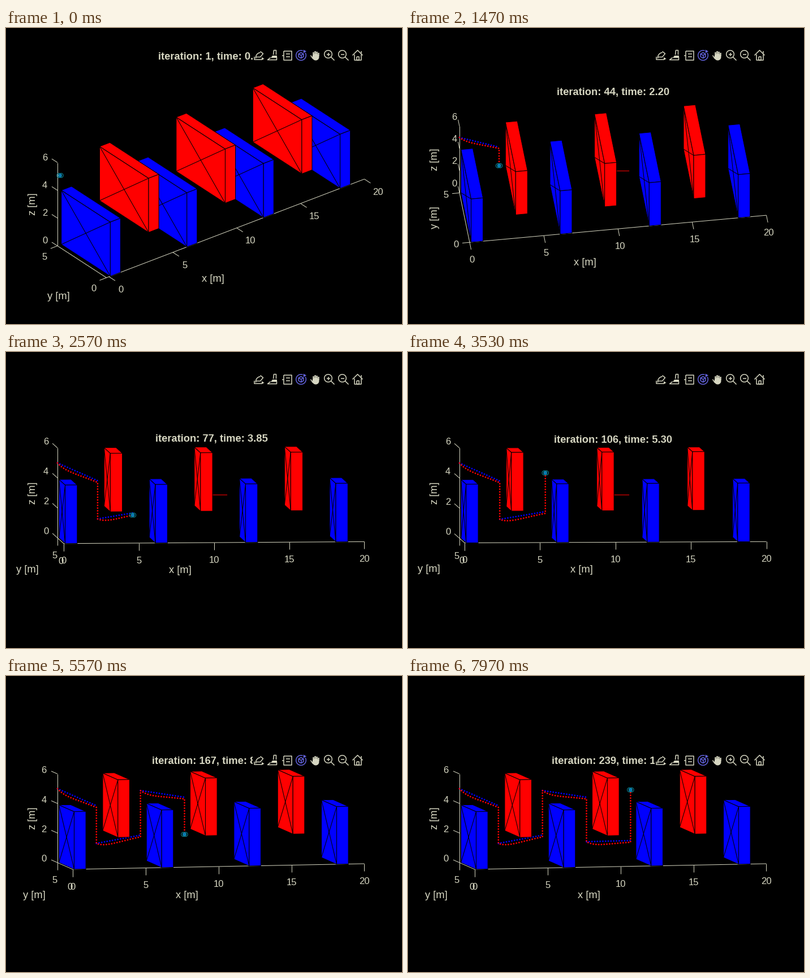
These frames come from a looping animation (700x525 px, 8 s). A matplotlib script:

```python
import numpy as np
import matplotlib.pyplot as plt
from matplotlib.animation import FuncAnimation
from matplotlib.collections import LineCollection, PolyCollection
from matplotlib.patches import Circle, Rectangle
from matplotlib.transforms import Affine2D

W, H, DPI, FRAMES, STEP_MS = 700, 525, 100, 320, 25
PX = 72 / DPI                      # points per pixel
TEXT, PURPLE = "#d7d7c2", "#6464e0"
TICK_PX, LABEL_PX = 16.67, 18.33
TOOLBAR_MOVE = 138

plt.rcParams["font.family"] = "Liberation Sans"
fig = plt.figure(figsize=(W / DPI, H / DPI), dpi=DPI, facecolor="black")
ax = fig.add_axes([0, 0, 1, 1])
ax.set(xlim=(0, W), ylim=(H, 0))
ax.axis("off")

# mouse drags: first and last iteration, turn in azimuth and elevation
DRAGS = [(26, 44, 29.7, 12), (50, 61, -1.8, -32.8), (61, 82, 5.7, -5.7), (112, 124, -7.9, 1.8)]

# flight in legs: forward for a fixed time, then straight up or down
STARTS = np.array([0, 60, 111, 176, 240])
HEIGHTS = np.array([5, 1.25, 4.77, 1.25, 4.77])    # at the start of each leg
CORNERS = np.array([3.8, 1.75, 4.26, 1.27])        # at the end of its forward part
FORWARD = 22


def ease(t, start, end):
    u = np.clip((t - start) / (end - start), 0, 1)
    return u * u * (3 - 2 * u)


def flight(t):
    """Planned x and z, flown z, and whether the plan is moving forward."""
    i = np.clip(np.searchsorted(STARTS, t, side="right") - 1, 0, len(CORNERS) - 1)
    turn = STARTS[i] + FORWARD
    u = np.clip((t - STARTS[i]) / FORWARD, 0, 1)
    v = np.clip((t - turn) / (STARTS[i + 1] - turn), 0, 1)
    rise = v + 0.06 * np.sin(np.pi * v)
    x0, x1 = (np.maximum(0, 3.02 * k - 0.35) for k in (i, i + 1))
    x = x0 + (x1 - x0) * u
    z = HEIGHTS[i] + (CORNERS[i] - HEIGHTS[i]) * u + (HEIGHTS[i + 1] - CORNERS[i]) * rise
    lag = (0.05 * u + 1.8 * u * np.exp(-3.3 * u)) * (1 - v)
    return x, z, z - lag, v == 0


class Camera:
    """Orthographic view fitted to the width of the plot area."""

    def __init__(self, t, xmin):
        az = -37.5 + sum(d * ease(t, a, b) for a, b, d, _ in DRAGS)
        self.az = -az
        self.el = 30 + sum(d * ease(t, a, b) for a, b, _, d in DRAGS)
        a, e = np.radians([self.az, self.el])
        ca, sa, ce, se = np.cos(a), np.sin(a), np.cos(e), np.sin(e)
        span = 20 - xmin
        s = 542.5 / (span * ca + 5 * sa)
        self.ex = s * np.array([ca, -sa * se])
        self.ey = s * np.array([-sa, -ca * se])
        self.ez = s * np.array([0, -ce])
        height = s * (span * sa * se + 5 * ca * se + 6 * ce)
        self.top = 253.3 - height / 2
        self.origin = np.array([91 + 5 * sa * s, 253.3 + height / 2]) - xmin * self.ex

    def __call__(self, x, y, z):
        x, y, z = (np.asarray(v, float)[..., None] for v in (x, y, z))
        return self.origin + x * self.ex + y * self.ey + z * self.ez


def unit(v):
    return v / np.hypot(*v)


def text(s, size, **kw):
    return ax.text(0, 0, s, size=size * PX, color=TEXT, ha="center", va="baseline",
                   rotation_mode="anchor", zorder=4, **kw)


def put_tick(label, p):
    label.set_position((p[0], p[1] + 0.345 * TICK_PX))


def put_label(label, p, upright=False):
    label.set_rotation(90 if upright else 0)
    label.set_position((p[0] + 5, p[1]) if upright else (p[0], p[1] + 5))


# plot artists
x_ticks = {v: text(str(v), TICK_PX) for v in range(0, 21, 5)}
y_ticks = {v: text(str(v), TICK_PX) for v in (0, 5)}
z_ticks = {v: text(str(v), TICK_PX) for v in range(0, 7, 2)}
x_label, y_label, z_label = (text(f"{c} [m]", LABEL_PX) for c in "xyz")
title = text("", LABEL_PX, weight="bold")

frame_lines = LineCollection([], colors=TEXT, linewidths=PX, zorder=1)
ax.add_collection(frame_lines)


def dotted(color, z):
    return ax.plot([], [], color=color, lw=2.9 * PX, ls=(0, (0.01, 1.65)),
                   dash_capstyle="round", zorder=z)[0]


blue_path, red_path = dotted("blue", 1.5), dotted("red", 1.6)
pivot, = ax.plot([362, 389.5], [253, 253], color="#e00000", lw=1.2 * PX, zorder=1.7)

# far blocks first; every second one is red and raised
BLOCKS = [(0.1 + 3 * i, 2.1 * (i % 2), ("blue", "red")[i % 2]) for i in range(6, -1, -1)]
block_art = PolyCollection([], edgecolors="black", linewidths=PX, zorder=2,
                           facecolors=[c for _, _, c in BLOCKS for _ in range(5)])
ax.add_collection(block_art)

rotors = [Circle((0, 0), 3.8, fill=False, ec="#0b8090", lw=1.1 * PX, zorder=3) for _ in range(2)]
body = Circle((0, 0), 3.2, fc="#0a78b4", ec="#0b8090", lw=0.8 * PX, zorder=3.1)
for part in (*rotors, body):
    ax.add_patch(part)


# toolbar icons, each drawn around its own centre
def arc(r, start=0, end=360, n=40, x=0, y=0):
    a = np.radians(np.linspace(start, end, n))
    return np.c_[x + r * np.cos(a), y + r * np.sin(a)]


def box(x, y, w, h):
    return [(x, y), (x + w, y), (x + w, y + h), (x, y + h), (x, y)]


def export_icon():
    return ([[(-8, 2), (-8, 7), (5, 7)], arc(9, 170, 265, x=4, y=4),
             [(-5, 3), (3, 3), (8, -3), (3, -7)]], [arc(3, 0, 360, 4, x=7, y=6)])


def brush_icon():
    return [[(1, -1), (2, -9), (6, -9), (6, -1)], [(-4, 4), (-9, 8), (7, 8), (7, 3)]], \
           [[(-1, 0), (7, 0), (7, 4), (-4, 4)]]


def tip_icon():
    return [box(-6, -8, 14, 16), [(-9, 0), (-6, 0)]] + [[(-2, y), (5, y)] for y in (-3, 2)], []


def rotate_icon():
    cube = arc(5, -90, 270, 7)
    return ([arc(8.8, -30, 290), cube] + [[(0, 0), cube[k]] for k in (1, 3, 5)],
            [arc(3.5, 0, 360, 4, x=6, y=-7)])


def hand_icon():
    fingers = [[(x, y), (x, 1)] for x, y in zip((-3, 0, 3, 6), (-6, -8, -7, -5))]
    wide = [[(x + d, y) for x, y in f] for f in fingers for d in (-0.4, 0.4)]
    return wide + [[(-8, 0), (-4, 6)]], [arc(6, x=1, y=3)]


def zoom_icon(plus):
    cross = [[(-5, -2), (1, -2)]] + [[(-2, -5), (-2, 1)]] * plus
    return [arc(6.8, x=-2, y=-2), [(3, 3), (9, 9)]] + cross, []


def home_icon():
    return [[(-9, 0), (0, -9), (9, 0)], [(-6, -2), (-6, 8), (6, 8), (6, -2)],
            box(-2, 2, 4, 6), [(6, -4), (6, -8)]], []


shift = Affine2D()
tool_tr = shift + ax.transData


def build_toolbar():
    ax.add_patch(Rectangle((435.5, -13), 198, 26, fc="black", transform=tool_tr, zorder=6))
    icons = [export_icon(), brush_icon(), tip_icon(), rotate_icon(), hand_icon(),
             zoom_icon(True), zoom_icon(False), home_icon()]
    for k, (lines, fills) in enumerate(icons):
        offset = (446.5 + 25 * k, 0)
        color = PURPLE if k == 3 else TEXT
        lines, fills = ([np.array(p, float) + offset for p in part] for part in (lines, fills))
        ax.add_collection(LineCollection(lines, colors=color, linewidths=1.5 * PX,
                                         transform=tool_tr, zorder=7))
        ax.add_collection(PolyCollection(fills, facecolors=color, edgecolors="none",
                                         transform=tool_tr, zorder=7))


build_toolbar()


def draw_axes(cam, xmin):
    low = cam.el < 20              # flat views hang the ticks straight down
    down = np.array([0.0, 1.0])
    dx = down if low else unit(-cam.ey)
    dy = down if low else unit(-cam.ex)
    dz = unit(cam.ey)
    segs = [cam([xmin, 20], [0, 0], [0, 0]), cam([xmin] * 2, [0, 5], [0, 0]),
            cam([xmin] * 2, [5, 5], [0, 6])]

    for v, label in x_ticks.items():
        p = cam(v, 0, 0)
        segs.append([p, p + 13 * dx])
        half = 4.63 * len(label.get_text())
        put_tick(label, p + (13 * dx[0] + abs(dx[0]) ** 1.5 * (8 + half), 12.2 + 17.8 * dx[1]))
    for v, label in y_ticks.items():
        p = cam(xmin, v, 0)
        segs.append([p, p + 13 * dy])
        off = (-5.3, 30.5) if low else (-25 + 7 * dy[1], 13 * dy[1] + 73 * abs(dy[1]) ** 1.6)
        put_tick(label, p + off)
    for v, label in z_ticks.items():
        p = cam(xmin, 5, v)
        segs.append([p, p + 12 * dz])
        put_tick(label, p + 12 * dz + (-5 - 8.8 * abs(dz[0]), -6 * abs(dz[1])))
    frame_lines.set_segments(segs)

    side = -62 + 0.53 * cam.az
    put_label(x_label, cam(10, 0, 0) + (side, 48.5 - 4.8 * cam.ex[1]))
    mid = cam(xmin, 2.5, 0)
    if -cam.ey[1] > -2 * cam.ey[0]:
        put_label(y_label, (47, mid[1]), upright=True)
    else:
        put_label(y_label, mid + (side + 1, 49 + 0.6 * np.hypot(*cam.ey)))
    put_label(z_label, (47, cam(xmin, 5, 3)[1]), upright=True)


def draw_blocks(cam):
    polys = []
    for x0, z0, _ in BLOCKS:
        x1, y1, z1 = x0 + 0.8, 5, z0 + 3.9
        side = cam([x0] * 4, [0, y1, y1, 0], [z0, z0, z1, z1])
        polys += [side,
                  cam([x0, x1, x1, x0], [0, 0, y1, y1], [z1] * 4),
                  cam([x0, x1, x1, x0], [0] * 4, [z0, z0, z1, z1]),
                  side[[0, 2]], side[[1, 3]]]
    block_art.set_verts(polys)


def draw_flight(cam, t):
    x, planned, flown, forward = flight(np.arange(0, t + 0.25, 0.5))
    red, blue = (cam(x, np.full_like(x, 5), z) for z in (flown, planned))
    blue[~forward] = np.nan
    red_path.set_data(*red.T)
    blue_path.set_data(*blue.T)
    px, py = red[-1]
    for part, dx in zip((*rotors, body), (-1.9, 1.9, 0)):
        part.center = px + dx, py


def update(n):
    t = (3 * n + 2) // 4           # simulation steps, 30 per second
    xmin = min(0, float(flight(t)[0]) - 0.2)
    cam = Camera(t, xmin)
    draw_axes(cam, xmin)
    draw_blocks(cam)
    draw_flight(cam, t)
    it = max(1, t)
    title.set_text(f"iteration: {it}, time: {it * 0.05:.2f}")
    title.set_position((363, cam.top - 7.5))
    pivot.set_visible(DRAGS[0][0] < t < DRAGS[-1][1])
    shift.clear().translate(0, 48.5 if t < TOOLBAR_MOVE else 149.5)
    return []


anim = FuncAnimation(fig, update, frames=FRAMES, init_func=lambda: update(0),
                     interval=STEP_MS, repeat=True, repeat_delay=0, blit=False)
plt.show()
```
